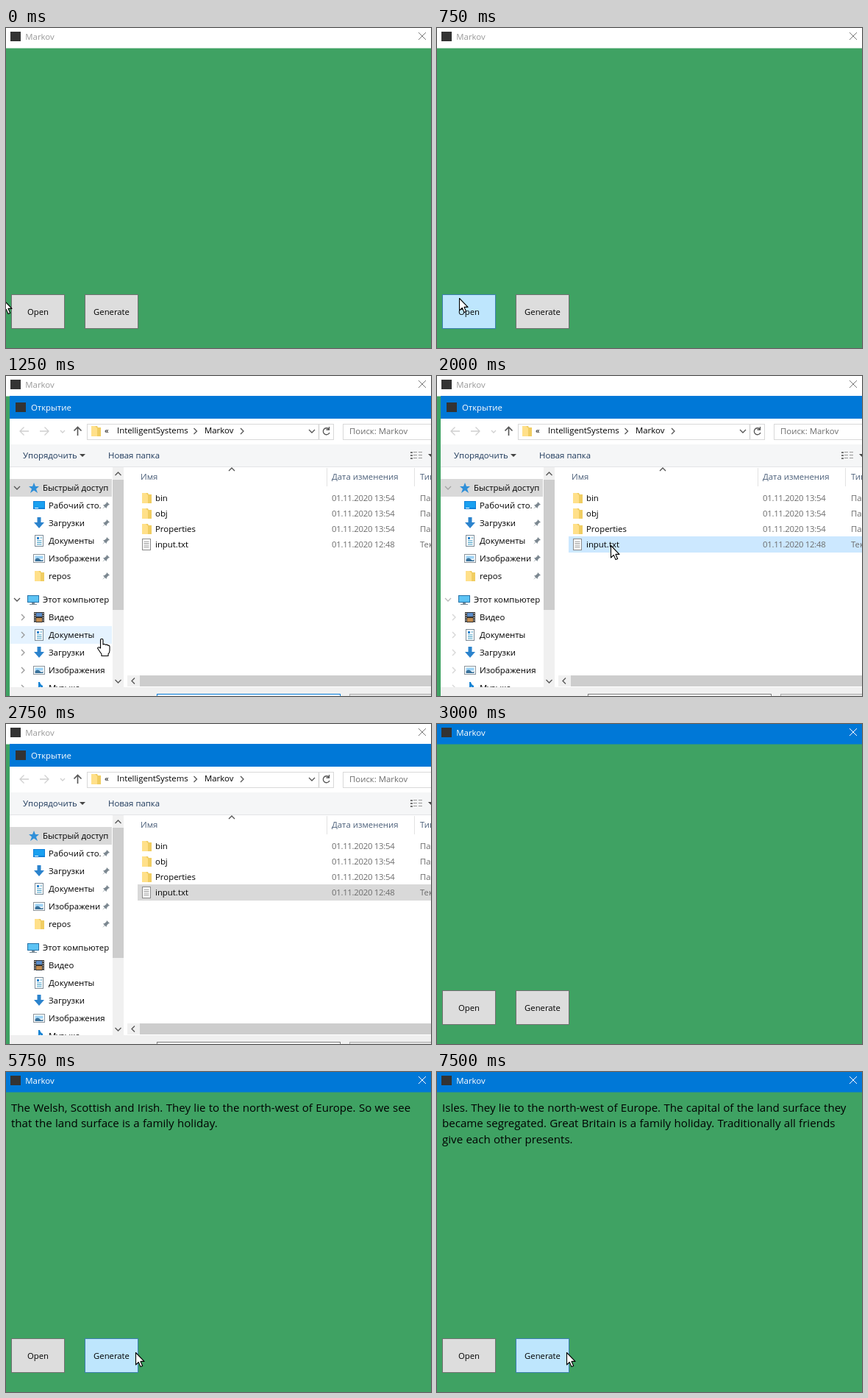
Recreate the animation shown at these times as an HTML page. Size 578x435 px, loop 8 s.

```html
<!DOCTYPE html>
<html lang="ru">
<head>
<meta charset="utf-8">
<title>Markov</title>
<style>
  html, body { margin: 0; width: 100%; height: 100%; overflow: hidden; background: #3fa263; }
  svg { display: block; }
  text { font: 11.4px "Open Sans", "Noto Sans", sans-serif; fill: #000; white-space: pre; }
  .muted { fill: #6d6d6d; }
  .head { fill: #4c607a; }
  .date { fill: #6d6d6d; letter-spacing: -.3px; }
  .out { font-size: 15.1px; word-spacing: .35px; }
  .line { fill: none; stroke: #555; stroke-width: 1.3; }
  .pale { stroke: #d0d0d0; }
  #bar { fill: #fff; }
  #caption { fill: #999; }
  #cross { fill: none; stroke: #777; stroke-width: 1; }
  .active #bar { fill: #0078d7; }
  .active #caption { fill: #fff; }
  .active #cross { stroke: #fff; }
  .button rect { fill: #ddd; stroke: #707070; }
  .button text { text-anchor: middle; font-size: 11.3px; }
  .button.hover rect { fill: #bee6fd; stroke: #3c7fb1; }
  .button.press rect { fill: #c4e5f6; stroke: #2c628b; }
</style>
</head>
<body>
<svg id="stage" width="578" height="435" viewBox="0 0 578 435"></svg>
<script>
const rect = (x, y, w, h, fill, more = '') =>
  `<rect x="${x}" y="${y}" width="${w}" height="${h}" fill="${fill}" ${more}/>`;
const text = (x, y, s, cls = '', more = '') => `<text x="${x}" y="${y}" class="${cls}" ${more}>${s}</text>`;
const path = (d, cls = 'line', more = '') => `<path d="${d}" class="${cls}" ${more}/>`;
const fill = (d, color, more = '') => `<path d="${d}" fill="${color}" ${more}/>`;
const at = (x, y, s) => `<g transform="translate(${x} ${y})">${s}</g>`;
const chevron = {
  right: (x, y, more) => path(`M${x - 2} ${y - 4}l4 4l-4 4`, 'line', more),
  left: (x, y) => path(`M${x + 2} ${y - 4}l-4 4l4 4`),
  down: (x, y) => path(`M${x - 4} ${y - 2}l4 4l4 -4`),
  up: (x, y) => path(`M${x - 4} ${y + 2}l4 -4l4 4`)
};

// Icons are centred on 0,0
const icon = {
  star: fill('M0 -7L2 -2L7 -2L3 1.5L5 7L0 3.5L-5 7L-3 1.5L-7 -2L-2 -2Z', '#2f8fd8'),
  desktop: rect(-8, -6, 16, 11, '#0f7fd8') + rect(-7, -5, 14, 8, '#19a0f0') + rect(-6, 3, 5, 1, '#fff'),
  arrow: fill('M-2.5 -8H2.5V-1H7L0 7L-7 -1H-2.5Z', '#2b83cd'),
  doc: rect(-5.5, -7.5, 11, 15, '#fff', 'stroke="#7d8c98"') + rect(-3, -5, 3, 3, '#2b83cd') +
    path('M1.5 -4H4M-3 0H3.5M-3 2.5H3.5M-3 5H3.5', 'line', 'style="stroke:#3d9bc4;stroke-width:1"'),
  picture: rect(-7.5, -5.5, 15, 11, '#fff', 'stroke="#8a949c"') + rect(-5.5, -3.5, 11, 4, '#9fd3f5') +
    fill('M-5.5 4V1Q-2 -2 1 1T5.5 1V4Z', '#38719a'),
  folder: fill('M-6 -7H2L3 -5H7V7H-6Z', '#f0cd62') + fill('M-6 -7H-1L2 -4V7H-6Z', '#ffe08a'),
  monitor: rect(-8, -6, 16, 10, '#2673a8') + rect(-7, -5, 14, 8, '#5cc3f4') +
    rect(-2, 4, 4, 2, '#7b8b96') + rect(-5, 6, 10, 1, '#7b8b96'),
  film: rect(-7, -7, 14, 14, '#333') + rect(-4, -6, 8, 5, '#5b8cc8') + rect(-4, 1, 8, 5, '#c08a4e') +
    path('M-5.5 -6V7M5.5 -6V7', 'line', 'style="stroke:#ddd" stroke-dasharray="1.5 1.5"'),
  note: fill('M-1 -8H1Q2 -4 5 -3V1L1 -2V5Q-1 8 -4 6Q-4 3 -1 3Z', '#1583d4'),
  page: rect(-5.5, -7.5, 11, 15, '#fff', 'stroke="#8a8a8a"') +
    path('M-3.5 -4H3.5M-3.5 -1.5H3.5M-3.5 1H3.5M-3.5 3.5H3.5', 'line', 'style="stroke:#999;stroke-width:1"'),
  pin: fill('M1 -5L5 -1L3 -.5L1 2L.5 4L-1.5 2L-5 5L-2 1.5L-4 -.5L-2 -1L.5 -3Z', '#7b8790')
};
const appMark = (x, y) => rect(x, y, 14, 13, '#333');

const button = (id, x, label) =>
  `<g id="${id}" class="button">${rect(x + .5, 362.5, 72, 46, '')}${text(x + 36.5, 390, label)}</g>`;

const windowBase = () =>
  rect(0, 0, 578, 435, '#3fa263') +
  `<g id="title">${rect(0, 0, 578, 27.5, '', 'id="bar"')}${appMark(6, 5)}` +
  text(26.3, 16, 'Markov', '', 'id="caption"') + '<path id="cross" d="M561 6L571 16M571 6L561 16"/></g>' +
  '<g id="output"></g>' + button('open', 7, 'Open') + button('generate', 107, 'Generate');

const toolbar = () =>
  rect(5, 27, 573, 31, '#0078d7') + appMark(13, 36) + text(34, 47, 'Открытие', '', 'style="fill:#fff"') +
  path('M31 75H19M24.5 69.5L19 75L24.5 80.5M46 75H58M52.5 69.5L58 75L52.5 80.5', 'line pale') +
  path('M74 74l3 3l3 -3', 'line pale') +
  path('M97.5 81V69.5M92.5 74.5L97.5 69.5L102.5 74.5', 'line', 'style="stroke-width:1.6"') +
  rect(110.5, 65.5, 335, 21, '#fff', 'stroke="#d9d9d9"') + at(122, 75, icon.folder) +
  text(134, 78, '«') + text(151, 78, 'IntelligentSystems') + chevron.right(257.5, 75) +
  text(270, 78, 'Markov') + `<g id="crumb">${chevron.right(321, 75)}</g>` +
  chevron.down(416, 75) + path('M425.5 66V86', 'line pale') +
  path('M439 72A4.5 4.5 0 1 0 440 77M439.5 69V73H435.5') +
  rect(458.5, 65.5, 130, 21, '#fff', 'stroke="#d9d9d9"') + text(467, 79, 'Поиск: Markov', 'muted') +
  rect(5, 93, 573, 30, '#f5f6f7') + rect(5, 123, 573, 1, '#e3e5e7') +
  text(23, 112, 'Упорядочить', '', 'style="fill:#1e395b"') + fill('M100 106h8l-4 4z', '#444') +
  text(139, 112, 'Новая папка', '', 'style="fill:#1e395b"') +
  [0, 4, 8].map(d => rect(550, 103 + d, 3, 2, '#777') + rect(554, 103 + d, 5, 1, '#999') +
    rect(561, 103 + d, 5, 1, '#999')).join('') + fill('M574 106h8l-4 4z', '#444');

const navRow = (y, pic, label, pinned) =>
  at(45, y, icon[pic]) + text(58, y + 4, label) + (pinned ? at(136, y, icon.pin) : '');

function navPane() {
  const quick = [['desktop', 'Рабочий сто.'], ['arrow', 'Загрузки'], ['doc', 'Документы'],
    ['picture', 'Изображени'], ['folder', 'repos']];
  const places = [['film', 'Видео'], ['doc', 'Документы'], ['arrow', 'Загрузки'],
    ['picture', 'Изображения'], ['note', 'Музыка']];
  return '<g clip-path="url(#pane)">' + rect(5, 140, 139, 24, '#d9d9d9') +
    rect(5, 340, 139, 24, '#e5f3ff', 'id="navHover"') +
    at(38, 152, icon.star) + text(50, 156, 'Быстрый доступ') +
    quick.map((r, i) => navRow(176 + 24 * i, ...r, true)).join('') +
    at(37, 304, icon.monitor) + text(50, 308, 'Этот компьютер') +
    places.map((r, i) => navRow(328 + 24 * i, ...r)).join('') +
    '<g id="twisties">' + chevron.down(15, 152) + chevron.down(15, 304) +
    places.map((r, i) => chevron.right(23, 328 + 24 * i, 'style="stroke:#999"')).join('') + '</g></g>' +
    rect(145, 124, 15, 299, '#f0f0f0') + rect(145, 141, 15, 177, '#cdcdcd') +
    chevron.up(152.5, 133) + chevron.down(152.5, 415);
}

function fileList() {
  const files = [['folder', 'bin'], ['folder', 'obj'], ['folder', 'Properties'], ['page', 'input.txt']];
  return text(183, 141, 'Имя', 'head') + path('M303 129l4 -4l4 4') +
    text(443, 141, 'Дата изменения', 'head') + text(563, 141, 'Тип', 'head') +
    rect(436, 125, 1, 25, '#e2e2e2') + rect(555, 125, 1, 25, '#e2e2e2') +
    rect(179, 218, 399, 22, 'none', 'id="row"') +
    files.map(([pic, name], i) => {
      const y = 166 + 21 * i, isFile = pic === 'page';
      return at(191, y, icon[pic]) + text(203, y + 4, name) +
        text(443, y + 4, '01.11.2020 ' + (isFile ? '12:48' : '13:54'), 'date') +
        text(563, y + 4, isFile ? 'Текстовый' : 'Папка', 'muted');
    }).join('') +
    rect(165, 407, 413, 15, '#f0f0f0') + rect(182, 407, 396, 15, '#cdcdcd') + chevron.left(173, 414.5);
}

const dialog = () => '<g id="dialog">' + rect(5, 27, 573, 420, '#fff') + toolbar() + navPane() + fileList() +
  rect(5, 423, 573, 24, '#f0f0f0') +
  rect(205.5, 432.5, 249, 20, '#fff', 'id="edit"') +
  rect(467.5, 432.5, 130, 20, '#e1e1e1', 'stroke="#adadad"') + '</g>';

const outline = 'stroke="#000" stroke-width="1.1" stroke-linejoin="round"';
const pointers =
  fill('M.5 .5V17L4.3 13.4L7 19.6L9.7 18.4L7 12.4H12Z', '#fff', `id="arrow" ${outline}`) +
  fill('M-1.5 13V2a1.7 1.7 0 0 1 3.5 0V8q2 -1.2 3.5 .5q2 -1 3 .7q2.5 -.5 2.5 2V16q0 3 -2 5v2.5H0v-2.5' +
    'q-2 -2.5 -5.5 -8q1 -2.5 4 0z', '#fff', `id="hand" ${outline}`);

const stage = document.getElementById('stage');
stage.innerHTML = '<clipPath id="pane"><rect x="5" y="124" width="139" height="299"/></clipPath>' +
  windowBase() + dialog() + pointers;
const el = Object.fromEntries([...stage.querySelectorAll('[id]')].map(n => [n.id, n]));

const outputs = [
  [],
  ['He kept half-wild cattle and pigs in a direct way. So we see that the English',
    'always whine and call them "whining poms". The Welsh, Scottish and Irish.'],
  ['The Welsh, Scottish and Irish. They lie to the north-west of Europe. So we see',
    'that the land surface is a family holiday.'],
  ['Isles. They lie to the north-west of Europe. The capital of the land surface they',
    'became segregated. Great Britain is a family holiday. Traditionally all friends',
    'give each other presents.']
];

// Each step: start time and the values that change there; the rest carries over
const steps = [
  { t: 0, x: -4, y: 369, open: '', generate: '', shown: 0, twisties: 0, row: 'none', edit: '#0078d7', out: 0 },
  { t: 250, x: 10, y: 377, open: 'hover' },
  { t: 500, x: 24, y: 370, open: 'press' },
  { t: 750, x: 30, y: 367, open: 'hover' },
  { t: 1000, x: 31, y: 366, shown: .9, twisties: .4 },
  { t: 1250, x: 130, y: 357, open: '', shown: 1, twisties: 1, hand: true },
  { t: 1500, x: 240, y: 300, hand: false, twisties: .85 },
  { t: 1750, x: 236, y: 230, row: '#e5f3ff', twisties: .6 },
  { t: 2000, row: '#cce8ff', edit: '#7a7a7a', twisties: .4 },
  { t: 2250, x: 330, y: 320, twisties: .2 },
  { t: 2500, x: 540, y: 422, twisties: 0 },
  { t: 2750, y: 500, row: '#d9d9d9' },
  { t: 3000, shown: 0, active: true },
  { t: 3500, x: 187, y: 421 },
  { t: 3750, x: 183, y: 372 },
  { t: 4000, x: 179, y: 379, generate: 'hover' },
  { t: 4250, x: 177, y: 380, out: 1 },
  { t: 4750, x: 176, y: 381 },
  { t: 5500, generate: 'press' },
  { t: 5750, generate: 'hover', out: 2 },
  { t: 6750, out: 3 }
];

const shrink = 'translate(400 240) scale(.995) translate(-400 -240)';
function show(s) {
  const place = `translate(${s.x} ${s.y})`;
  el.arrow.setAttribute('transform', place);
  el.hand.setAttribute('transform', place);
  el.arrow.style.display = s.hand ? 'none' : '';
  el.hand.style.display = el.navHover.style.display = s.hand ? '' : 'none';
  for (const id of ['open', 'generate']) el[id].setAttribute('class', 'button ' + s[id]);
  el.title.setAttribute('class', s.active ? 'active' : '');
  el.dialog.style.opacity = s.shown;
  el.dialog.setAttribute('transform', s.shown < 1 ? shrink : '');
  el.crumb.style.display = s.shown < 1 ? 'none' : '';
  el.twisties.style.opacity = s.twisties;
  el.row.setAttribute('fill', s.row);
  el.edit.setAttribute('stroke', s.edit);
  el.output.innerHTML = outputs[s.out].map((line, i) => text(7, 54 + 21.4 * i, line, 'out')).join('');
}

const loop = 8000;
const states = [];
for (const step of steps) states.push({ ...states.at(-1), ...step });
const start = performance.now();
let current;
function tick() {
  const t = (performance.now() - start) % loop;
  const state = states.findLast(s => s.t <= t);
  if (state !== current) show(current = state);
  requestAnimationFrame(tick);
}
tick();
</script>
</body>
</html>
```
